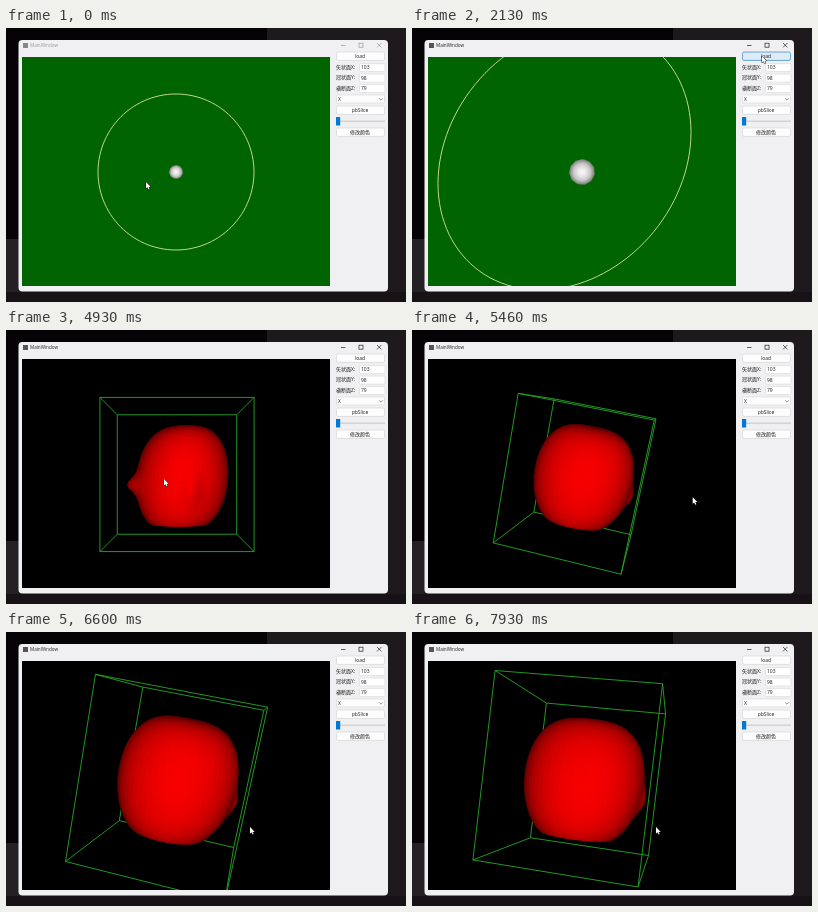
Animation of 400 by 274 pixels, one loop 8000 ms. Source, as an HTML page with a canvas:

```html
<!DOCTYPE html>
<html lang="zh-CN">
<head>
<meta charset="utf-8">
<title>Volume viewer</title>
<style>
html, body { margin: 0; width: 100%; height: 100%; overflow: hidden; background: #000; }
canvas { display: block; width: 400px; height: 274px; }
</style>
</head>
<body>
<canvas id="stage" width="400" height="274"></canvas>
<script>
const ctx = document.getElementById('stage').getContext('2d');
const LOOP = 8000, STEP = 1000 / 15, LOADED = 4460;
const FONT = '"Open Sans", "Noto Sans CJK SC", "Noto Sans CJK", sans-serif';
const VIEW = [16, 29, 308, 229];
const FOCAL = 461, CX = 171, CY = 144.5, HALF_WIDTH = 0.87;
const RAD = Math.PI / 180;

const ramp = (t, from, to) => Math.max(0, Math.min(1, (t - from) / (to - from)));
const hump = (t, from, to) => Math.sin(Math.PI * ramp(t, from, to));
const bell = v => Math.exp(-v * v);

function line(points, color, width = 1) {
  ctx.beginPath();
  points.forEach(p => ctx.lineTo(p[0], p[1]));
  ctx.strokeStyle = color;
  ctx.lineWidth = width;
  ctx.stroke();
}

function rect(x, y, w, h, color) {
  ctx.fillStyle = color;
  ctx.fillRect(x, y, w, h);
}

function box(x, y, w, h, r, fill, border) {
  ctx.beginPath();
  ctx.roundRect(x, y, w, h, r);
  ctx.fillStyle = fill;
  ctx.fill();
  if (!border) return;
  ctx.strokeStyle = border;
  ctx.lineWidth = 0.7;
  ctx.stroke();
}

function label(str, x, y, align = 'left', color = '#1c1c1c', size = 5) {
  ctx.font = size + 'px ' + FONT;
  ctx.textAlign = align;
  ctx.textBaseline = 'middle';
  ctx.fillStyle = color;
  ctx.fillText(str, x, y);
}

function button(str, y, lit) {
  box(330.5, y, 48, 8.4, 1.5, lit ? '#dcebf8' : '#fdfdfd', lit ? '#2f86cc' : '#d6d6d6');
  label(str, 354, y + 4.3, 'center');
}

function desktop() {
  rect(0, 0, 400, 274, '#1d191c');
  rect(0, 0, 261, 12, '#050305');
  rect(0, 12, 13, 199, '#050305');
  rect(0, 211, 13, 53, '#242124');
  rect(0, 264, 400, 10, '#171216');
}

function windowFrame(t) {
  const active = t >= 400, ink = active ? '#222' : '#999';
  box(12.5, 12, 369.5, 251.5, 4, '#f0f0f2');
  rect(17, 15, 5, 5, active ? '#555' : '#888');
  label('MainWindow', 24, 17.6, 'left', ink, 4.6);
  line([[335, 17.5], [339.5, 17.5]], ink, 0.7);
  ctx.strokeRect(353, 15.2, 4, 4);
  line([[371, 15], [375.4, 19.4]], ink, 0.7);
  line([[375.4, 15], [371, 19.4]], ink, 0.7);
}

function panel(t) {
  button('load', 24, t >= 1850 && t < LOADED);
  [['矢状面X:', '103'], ['冠状面Y:', '98'], ['横断面Z:', '79']].forEach(([name, value], i) => {
    const y = 39.6 + i * 10.5;
    label(name, 330, y);
    box(353.5, y - 4, 25.5, 8, 1, '#fff', '#dcdcdc');
    label(value, 355, y + 0.2);
  });
  box(330.5, 67, 48, 8, 1, '#fdfdfd', '#d8d8d8');
  label('X', 332, 71.2);
  line([[373.2, 70.4], [375, 72.2], [376.8, 70.4]], '#666', 0.7);
  button('pbSlice', 78);
  rect(330, 92.5, 49, 1.6, '#d4d4d4');
  rect(330, 89, 4.2, 8.5, '#0078d7');
  button('修改颜色', 100);
}

function ringScene(t) {
  rect(...VIEW, '#006400');
  const tilt = ramp(t, 400, 860), zoom = ramp(t, 850, 1510);
  const x = 170 - 6.5 * tilt - 11 * zoom, y = 144 - 6.5 * tilt - 7.5 * zoom;
  const a = 78 + 48.5 * zoom, b = 78 + 2 * tilt + 52 * zoom;
  const shift = -0.195 * tilt, loop = [];
  for (let i = 0; i <= 120; i++) {
    const q = i * Math.PI / 60;
    loop.push([x + a * Math.cos(q), y + b * Math.sin(q + shift)]);
  }
  line(loop, '#d3e2a2', 0.9);

  const r = 7 + 6 * zoom;
  const glow = ctx.createRadialGradient(170, 144, 0, 170, 144, r);
  ['#fafafa', '#e6e6e6', '#c4c4c4', '#70756c'].forEach((c, i) => glow.addColorStop(i / 3, c));
  ctx.beginPath();
  for (let i = 0; i < 11; i++) {
    const q = i * Math.PI * 2 / 11 + 0.2;
    ctx.lineTo(170 + r * Math.cos(q), 144 + r * Math.sin(q));
  }
  ctx.fillStyle = glow;
  ctx.fill();
}

// A rounded solid cut flat at the neck; side is 1 in profile, 0 from the front.
const ROWS = 40, COLS = 64;

function headPoint(i, j, side) {
  const u = i / ROWS, turn = u * 2.6, a = j / COLS * Math.PI * 2;
  const size = Math.sin(turn) ** 0.65;
  const y = 0.06 - 0.77 * Math.cos(turn);
  let x = 0.78 * (1 - 0.1 * u) * size * Math.sin(a);
  let z = -0.15 + 0.12 * u + 0.67 * size * Math.cos(a);
  z += side * 0.14 * bell((y - 0.15) / 0.13) * Math.max(0, Math.cos(a)) ** 12;
  x += Math.sign(Math.sin(a)) * 0.07 * bell((z + 0.2) / 0.11) * bell((y - 0.22) / 0.19);
  return [x, y, z];
}

function spin(p, i, j, angle) {
  const c = Math.cos(angle), s = Math.sin(angle), a = p[i], b = p[j];
  p[i] = a * c - b * s;
  p[j] = a * s + b * c;
}

function camera(yaw, pitch, roll, dist) {
  return point => {
    const p = [...point];
    spin(p, 0, 2, yaw * RAD);
    spin(p, 2, 1, pitch * RAD);
    spin(p, 0, 1, roll * RAD);
    const [x, y, z] = p, k = FOCAL / (dist - z);
    return { x, y, z, sx: CX + x * k, sy: CY + y * k };
  };
}

function drawHead(view, side, dist) {
  const grid = [], quads = [];
  for (let i = 0; i <= ROWS; i++) {
    grid.push([]);
    for (let j = 0; j <= COLS; j++) grid[i].push(view(headPoint(i, j, side)));
  }
  for (let i = 0; i < ROWS; i++) for (let j = 0; j < COLS; j++) {
    const p = grid[i][j], q = grid[i][j + 1], r = grid[i + 1][j + 1], s = grid[i + 1][j];
    const ax = r.x - p.x, ay = r.y - p.y, az = r.z - p.z;
    const bx = s.x - q.x, by = s.y - q.y, bz = s.z - q.z;
    const nx = ay * bz - az * by, ny = az * bx - ax * bz, nz = ax * by - ay * bx;
    const facing = nz * (dist - p.z) - nx * p.x - ny * p.y;
    if (facing <= 0) continue;
    const light = facing / (Math.hypot(nx, ny, nz) * Math.hypot(p.x, p.y, dist - p.z));
    quads.push({ pts: [p, q, r, s], z: p.z + r.z, light });
  }
  quads.sort((a, b) => a.z - b.z);
  ctx.lineWidth = 1;
  for (const { pts, light } of quads) {
    ctx.fillStyle = ctx.strokeStyle = `rgb(${Math.round(50 + 198 * light ** 0.8)},0,0)`;
    ctx.beginPath();
    pts.forEach(p => ctx.lineTo(p.sx, p.sy));
    ctx.closePath();
    ctx.fill();
    ctx.stroke();
  }
}

function headScene(t) {
  rect(...VIEW, '#000');
  const turn = ramp(t, 5000, 5460), zoom = ramp(t, 5500, 6000);
  const swing = hump(t, 5500, 6580), lift = ramp(t, 7000, 7920);
  const yaw = 90 - 82 * turn + 12 * swing + 3 * lift;
  const pitch = 9 * turn - 8.5 * lift;
  const roll = 11 * turn + 2 * swing - 4.2 * lift;
  const dist = 6.85 - 1.2 * zoom - 0.6 * swing;
  const view = camera(yaw, pitch, roll, dist);

  const corners = [], edges = [];
  for (let i = 0; i < 8; i++) {
    corners.push(view([i & 1 ? HALF_WIDTH : -HALF_WIDTH, i & 2 ? 1 : -1, i & 4 ? 1 : -1]));
  }
  for (let i = 0; i < 8; i++) for (const bit of [1, 2, 4]) {
    if (!(i & bit)) edges.push([corners[i], corners[i | bit]]);
  }
  const drawEdges = near => edges
    .filter(([a, b]) => (a.z + b.z > 0) === near)
    .forEach(([a, b]) => line([[a.sx, a.sy], [b.sx, b.sy]], '#26a826', 0.9));
  drawEdges(false);
  drawHead(view, Math.sin(yaw * RAD) ** 2, dist);
  drawEdges(true);
}

// Each stroke of the hand: start, end, target x and y.
const MOVES = [
  [400, 860, 168, 153], [1530, 1870, 350, 28], [2330, 3060, 211, 147],
  [4460, 4800, 158, 149], [5000, 5460, 280, 167], [5460, 5800, 317, 178],
  [6200, 6600, 244, 195]
];

function pointer(t) {
  let x = 140, y = 154;
  for (const [from, to, tx, ty] of MOVES) {
    const k = ramp(t, from, to);
    x += (tx - x) * k;
    y += (ty - y) * k;
  }
  x += 26 * hump(t, 7000, 7920);
  ctx.beginPath();
  [[0, 0], [0, 6.6], [1.5, 5.3], [2.6, 7.6], [3.6, 7.1], [2.6, 4.9], [4.6, 4.7]]
    .forEach(([dx, dy]) => ctx.lineTo(x + dx, y + dy));
  ctx.closePath();
  ctx.strokeStyle = '#111';
  ctx.lineWidth = 1;
  ctx.stroke();
  ctx.fillStyle = '#fff';
  ctx.fill();
}

function draw(t) {
  desktop();
  windowFrame(t);
  panel(t);
  ctx.save();
  ctx.beginPath();
  ctx.rect(...VIEW);
  ctx.clip();
  if (t < LOADED) ringScene(t);
  else headScene(t);
  ctx.restore();
  pointer(t);
}

const start = performance.now();
let shown = -1;
function tick() {
  const now = (performance.now() - start) % LOOP;
  const step = Math.floor((now + 7) / STEP) % (LOOP / STEP);
  if (step !== shown) {
    shown = step;
    draw(step * STEP);
  }
  requestAnimationFrame(tick);
}
tick();
</script>
</body>
</html>
```
